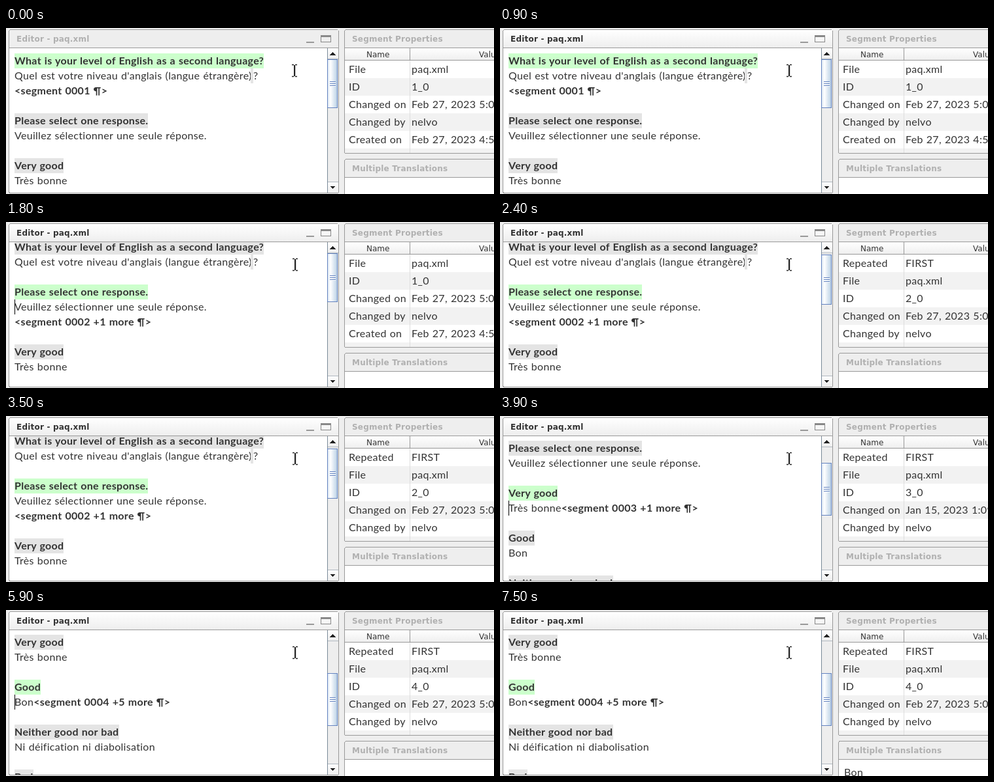
An HTML page for the animation above (8 s loop, 746x255 px).

```html
<!DOCTYPE html>
<html lang="en">
<head>
<meta charset="utf-8">
<title>Segment editor</title>
<style>
  html, body { margin: 0; width: 100%; height: 100%; overflow: hidden; background: #eee; }
  svg { display: block; width: 746px; height: 255px; }
  text { font: 16px Lato, sans-serif; letter-spacing: .3px; word-spacing: .7px; fill: #333; white-space: pre; }
  .bold { font-weight: 700; }
  .title { font: 700 12px "DejaVu Sans", sans-serif; letter-spacing: .2px; word-spacing: 0; }
  .head { font: 12px "DejaVu Sans", sans-serif; letter-spacing: 0; }
  .dim { fill: #b0b0b0; }
  rect, path { shape-rendering: crispEdges; }
</style>
</head>
<body>
<svg id="stage" viewBox="0 0 746 255">
  <defs>
    <linearGradient id="active" x2="0" y2="1">
      <stop stop-color="#fff"/><stop offset="1" stop-color="#eee"/>
    </linearGradient>
    <linearGradient id="metal">
      <stop stop-color="#dde8f3"/><stop offset=".3" stop-color="#fff"/><stop offset="1" stop-color="#b8cfe5"/>
    </linearGradient>
    <clipPath id="page"><rect x="6" y="31" width="485" height="222"/></clipPath>
    <clipPath id="grid"><rect x="518" y="50" width="228" height="142"/></clipPath>
  </defs>
  <g id="panels"></g>
  <g id="doc" clip-path="url(#page)"></g>
  <rect id="caret" width="1" height="23" fill="#000"/>
  <g id="bar"></g>
  <g id="table" clip-path="url(#grid)"></g>
  <g id="beam"></g>
</svg>
<script>
const $ = id => document.getElementById(id);
const LOOP = 8000, LINE = 23, ROW = 27, LEFT = 13;

function add(parent, name, attrs, content) {
  const el = document.createElementNS("http://www.w3.org/2000/svg", name);
  for (const key in attrs) el.setAttribute(key, attrs[key]);
  if (content !== undefined) el.textContent = content;
  parent.append(el);
  return el;
}
const box = (parent, x, y, width, height, fill, more) =>
  add(parent, "rect", { x, y, width, height, fill, ...more });
const frame = (parent, x, y, w, h, fill, stroke, more) =>
  box(parent, x + .5, y + .5, w - 1, h - 1, fill, { stroke, ...more });
const label = (parent, x, y, text, cls = "") =>
  add(parent, "text", { x, y, class: cls }, text);

const segments = [
  ["What is your level of English as a second language?", "Quel est votre niveau d'anglais (langue étrangère)"],
  ["Please select one response.", "Veuillez sélectionner une seule réponse."],
  ["Very good", "Très bonne"],
  ["Good", "Bon"],
  ["Neither good nor bad", "Ni déification ni diabolisation"],
  ["Bad", "Mauvais"]
];

// first: topmost segment, top: its y
const views = [
  { at: 0, first: 0, current: 0, top: 39, mark: "0001" },
  { at: 1800, first: 0, current: 1, top: 27, mark: "0002 +1 more" },
  { at: 3900, first: 1, current: 2, top: 38, mark: "0003 +1 more", inline: true },
  { at: 5900, first: 2, current: 3, top: 38, mark: "0004 +5 more", inline: true }
];

// The table and the scroll thumb [y, height] refresh together.
const late = "Feb 27, 2023 5:02 PM", early = "Jan 15, 2023 1:09 PM";
const info = (id, changed) => [["Repeated", "FIRST"], ["File", "paq.xml"], ["ID", id],
  ["Changed on", changed], ["Changed by", "nelvo"]];
const tables = [
  { at: 0, thumb: [48, 75], rows: [...info("1_0", late).slice(1), ["Created on", "Feb 27, 2023 4:51 PM"]] },
  { at: 1900, thumb: [50, 77], rows: info("2_0", late) },
  { at: 3900, thumb: [72, 81], rows: info("3_0", early) },
  { at: 5900, thumb: [97, 81], rows: info("4_0", late) }
];

const caretOn = [[400, 900], [1600, 2400], [3100, 3500], [3900, 4600], [5000, 5500], [5900, 6600], [7000, 7500]];

function drawPanel(x, y, w, h, title) {
  const p = $("panels");
  frame(p, x, y, w, h, "#fff", "#999", { rx: 3 });
  const bar = box(p, x + 1, y + 1, w - 2, 27, "#eee", { rx: 2 });
  box(p, x + 1, y + 28, w - 2, 1, "#999");
  return [bar, label(p, x + 12, y + 19, title, "title dim")];
}

const [editorBar, editorTitle] = drawPanel(4, 2, 505, 252, "Editor - paq.xml");
drawPanel(517, 2, 240, 191, "Segment Properties");
drawPanel(517, 201, 240, 80, "Multiple Translations");

function drawFixed() {
  const p = $("panels");
  box(p, 459, 21, 12, 2, "#999");
  frame(p, 481, 11, 16, 11, "none", "#888");
  box(p, 481, 11, 16, 3, "#888");
  box(p, 518, 31, 228, 19, "url(#active)");
  box(p, 518, 49, 228, 1, "#999");
  box(p, 617, 31, 1, 19, "#999");
  label(p, 551, 45, "Name", "head");
  label(p, 723, 45, "Value", "head");
}
drawFixed();
const translation = label($("panels"), 526, 255, "Bon");

const beam = $("beam"), shape = "M438 56.5h3m2 0h3M442 57v17M438 74.5h3m2 0h3";
add(beam, "path", { d: shape, stroke: "#ccc", "stroke-width": 3, fill: "none" });
add(beam, "path", { d: shape, stroke: "#222", "stroke-width": 1.5, fill: "none" });

function drawBar([y, h]) {
  const g = $("bar"), edge = "#7a8a99";
  g.replaceChildren();
  box(g, 491, 31, 17, 222, "#eee");
  box(g, 491, 31, 1, 222, edge);
  for (const [top, tip] of [[31, -1], [236, 1]]) {
    box(g, 492, top, 16, 17, "url(#active)");
    box(g, 492, tip < 0 ? top + 16 : top, 16, 1, "#b0b8c0");
    const mid = top + 8.5;
    add(g, "path", { d: `M495 ${mid - 2 * tip}h9l-4.5 ${4.5 * tip}z`, fill: "#222" });
  }
  frame(g, 491, y, 16, h, "url(#metal)", "#6382bf");
  const mid = Math.floor(y + h / 2);
  for (const dy of [-3, 0, 3]) {
    box(g, 495, mid + dy, 9, 1, "#6382bf");
    box(g, 495, mid + dy + 1, 9, 1, "#fff");
  }
}

function drawDoc(view) {
  const g = $("doc");
  g.replaceChildren();
  let y = view.top;
  segments.slice(view.first).forEach(([source, target], n) => {
    const i = n + view.first, current = i === view.current;
    const back = box(g, LEFT, y, 0, LINE, current ? "#cfc" : "#e4e4e4");
    const head = label(g, LEFT, y + 17, source, "bold");
    back.setAttribute("width", Math.round(head.getComputedTextLength()));
    y += LINE;
    const body = label(g, LEFT, y + 17, target);
    if (i === 0) {
      box(g, 374, y, 4, LINE, "#e4e4e4");
      label(g, 378, y + 17, "?");
    }
    if (current) {
      const mark = `<segment ${view.mark} ¶>`;
      if (view.inline) add(body, "tspan", { class: "bold" }, mark);
      else label(g, LEFT, (y += LINE) + 17, mark, "bold");
    }
    y += 2 * LINE;
  });
  $("caret").setAttribute("x", view.current ? 13 : 385);
  $("caret").setAttribute("y", view.top + (view.current ? 4 : 1) * LINE);
}

function drawTable({ rows, thumb }) {
  const g = $("table");
  g.replaceChildren();
  for (let i = 0; i < 6; i++) {
    const y = 50 + i * ROW;
    box(g, 518, y, 228, ROW, i % 2 ? "#f2f2f2" : "#fff");
    if (!rows[i]) continue;
    label(g, 524, y + 19, rows[i][0]);
    label(g, 620, y + 19, rows[i][1]);
  }
  box(g, 617, 50, 1, 142, "#ddd");
  drawBar(thumb);
}

const show = (el, on) => el.setAttribute("visibility", on ? "visible" : "hidden");
const pick = (list, t) => list.findLast(item => item.at <= t);
let view, table;

function render(t) {
  const nextView = pick(views, t), nextTable = pick(tables, t);
  if (nextView !== view) drawDoc(view = nextView);
  if (nextTable !== table) drawTable(table = nextTable);
  const focused = t >= 400;
  editorBar.setAttribute("fill", focused ? "url(#active)" : "#eee");
  editorTitle.classList.toggle("dim", !focused);
  beam.setAttribute("transform", `translate(${focused ? 0 : -1})`);
  show($("caret"), caretOn.some(([from, to]) => t >= from && t < to));
  show(translation, t >= 6000);
}

const start = performance.now();
function tick() {
  render((performance.now() - start) % LOOP);
  requestAnimationFrame(tick);
}
tick();
</script>
</body>
</html>
```
